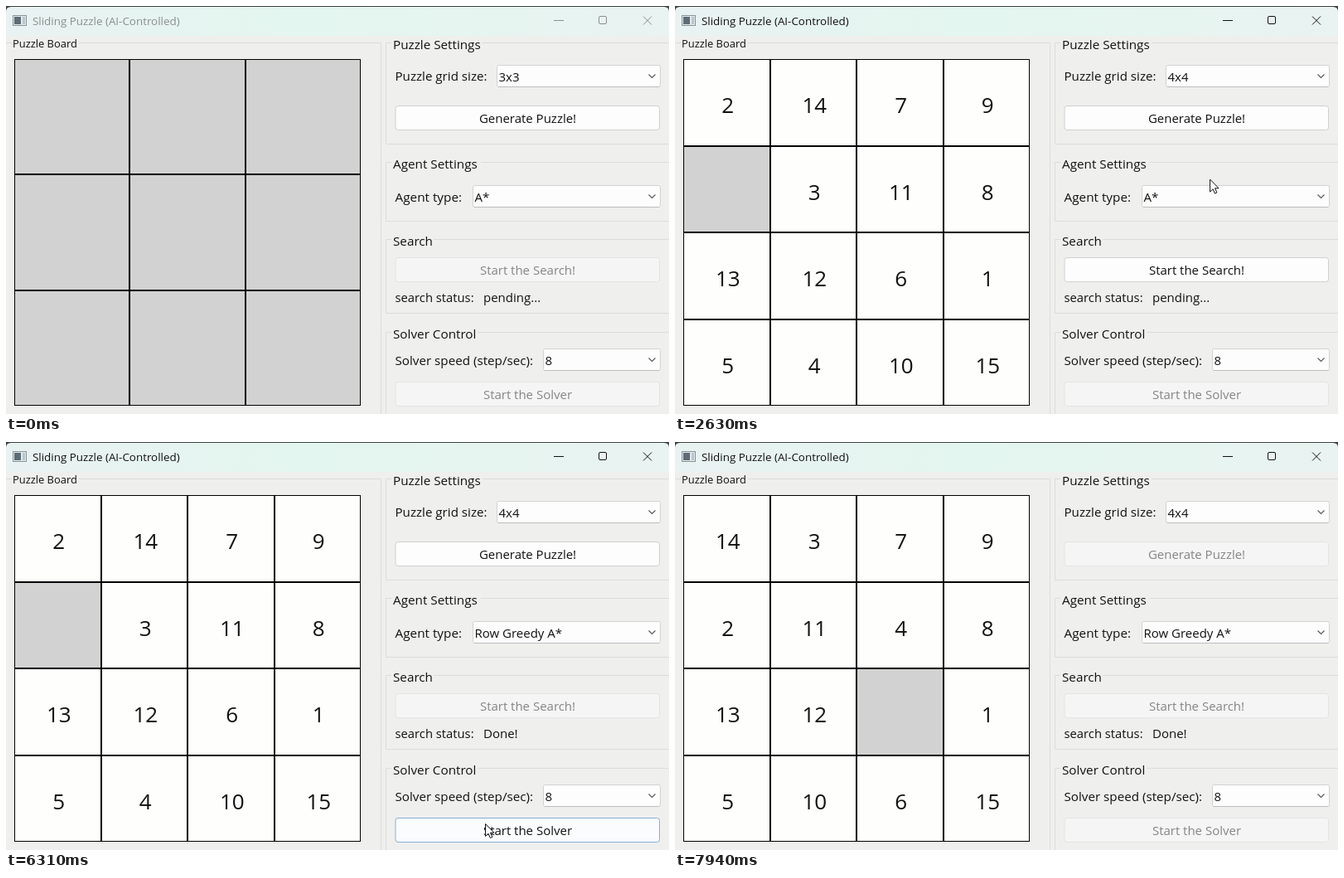
Recreate the animation shown at these times as an HTML page. Size 800 px wide and 492 px high, loop 8 s.

```html
<!DOCTYPE html>
<html lang="en">
<head>
<meta charset="utf-8">
<title>Sliding Puzzle</title>
<style>
html, body { margin: 0; height: 100%; overflow: hidden; background: #efefee; }
svg { display: block; width: 100vw; height: 100vh; font-family: "Open Sans", "Noto Sans", sans-serif; }
text { white-space: pre; }
</style>
</head>
<body>
<svg id="stage" viewBox="0 0 800 492"></svg>
<script>
const LOOP = 8000;
const stage = document.getElementById("stage");

// Moments of the recorded session, in ms
const AT = { sizeOpen: 1000, sizePick: 1560, press: 2090, generated: 2250,
  agentOpen: 2940, agentPick: 3560, search: 4060, done: 5380, solve: 6560 };

// Pointer path: time, x, y
const PATH = [[500, 801, 190], [900, 690, 86], [1050, 690, 86], [1350, 660, 144], [1600, 660, 144],
  [1950, 664, 133], [2350, 664, 133], [2750, 640, 229], [2980, 640, 229], [3250, 624, 285],
  [3600, 624, 285], [3850, 612, 318], [4110, 612, 318], [4350, 590, 402], [5880, 590, 402],
  [6230, 578, 460], [7060, 578, 460], [7400, 574, 494]];

const START = [2, 14, 7, 9, 0, 3, 11, 8, 13, 12, 6, 1, 5, 4, 10, 15];
const MOVES = [2, 14, 3, 12, 4, 10, 6, 4, 12, 11, 4];
const moveTime = i => i < 2 ? 6750 + 130 * i : 7000 + 117 * (i - 2);

const SIZES = ["3x3", "4x4", "5x5", "6x6", "7x7", "8x8"];
const AGENTS = ["A*", "Row Greedy A*", "BFS", "Q-Learning", "DFS", "IDS"];

const between = (t, a, b) => t >= a && t < b;
const rect = (x, y, w, h, fill, stroke = "none", more = "") =>
  `<rect x="${x}" y="${y}" width="${w}" height="${h}" fill="${fill}" stroke="${stroke}" ${more}/>`;
const line = (d, color, width = 1) =>
  `<path d="${d}" fill="none" stroke="${color}" stroke-width="${width}"/>`;
const text = (s, x, y, size = 15.15, color = "#111", more = "") =>
  `<text x="${x}" y="${y}" font-size="${size}" fill="${color}" ${more}>${s}</text>`;
const centred = 'text-anchor="middle"';

function pointer(t) {
  if (t < PATH[0][0]) return { x: 900, y: 190 };
  const i = PATH.findIndex(p => p[0] > t);
  if (i < 0) return { x: 574, y: 520 };
  const [t0, x0, y0] = PATH[i - 1], [t1, x1, y1] = PATH[i];
  const u = (t - t0) / (t1 - t0), e = u * u * (3 - 2 * u);
  return { x: x0 + (x1 - x0) * e, y: y0 + (y1 - y0) * e };
}

function titleBar(active) {
  const ink = active ? "#111" : "#8b8e8d";
  return `<defs><linearGradient id="bar"><stop stop-color="#e9f2f2"/><stop offset=".45" stop-color="#e3f6ef"/>
    <stop offset="1" stop-color="#e9f3f1"/></linearGradient></defs>`
    + rect(0, 0, 800, 20, "#3c4040")
    + `<path d="M0 36V7Q0 1 6 1H794Q800 1 800 7V36Z" fill="url(#bar)"/>`
    + rect(0, 36, 800, 456, "#efefee")
    + rect(8.5, 11.5, 16, 12, "#e4e9ec", "#87939a")
    + rect(10, 13, 8, 9, "#5d6c76") + rect(20, 13, 3, 9, "#b9c5cc")
    + text("Sliding Puzzle (AI-Controlled)", 32, 23, 13.4, ink)
    + line("M661 17.5H673", ink) + rect(715.5, 12.5, 9, 9, "none", ink, 'rx="1.5"')
    + line("M769 12.5L779 22.5M779 12.5L769 22.5", ink);
}

function group(title, y, bottom, lineFrom) {
  return line(`M465 ${y}.5H458.5V${bottom}.5H800M${lineFrom} ${y}.5H800`, "#dcdcdc")
    + text(title, 467, y + 8, 15.25);
}

function button(label, y, enabled, mouse, pressed) {
  const hover = enabled && between(mouse.x, 470, 790) && between(mouse.y, y, y + 30);
  const [fill, edge] = !enabled ? ["#f5f5f5", "#e4e4e4"] : pressed ? ["#cce3f7", "#22629f"]
    : hover ? ["#fafcfd", "#85b0d8"] : ["#fdfdfd", "#d0d0d0"];
  return rect(470, y + .5, 318.5, 29, fill, edge, 'rx="3"')
    + text(label, 629.5, y + 21, 15, enabled ? "#111" : "#858585", centred);
}

function combo(value, x, y, open) {
  return rect(x + .5, y + .5, 789 - x, 26, open ? "#cce3f7" : "#fdfdfd", open ? "#3f88c8" : "#d2d2d2", 'rx="2"')
    + (open ? rect(x + 3.5, y + 3.5, 204, 20, "none", "#333", 'stroke-dasharray="1 1"')
      : line(`M${x + 2} ${y + 26.5}H788`, "#bdbdbd"))
    + text(value, x + 2.5, y + 19.5, 15)
    + line(`M775.5 ${y + 11.5}l4 4 4-4`, "#555", 1.1);
}

function popup(items, x, y, mouse) {
  const row = mouse.y < y ? 0 : Math.floor((mouse.y - y) / 32);
  return rect(x + .5, y + .5, 789 - x, 192, "#f0f0ef", "#a5a5a5")
    + items.map((s, i) => (i === row ? rect(x + 1, y + i * 32, 788 - x, 32, "#0473d0") : "")
      + text(s, x + 7, y + i * 32 + 21, 13.1, i === row ? "#e4eef8" : "#111",
        i ? "" : 'font-weight="600"')).join("");
}

function board(t) {
  const solved = t >= AT.generated, n = solved ? 4 : 3;
  const tiles = solved ? [...START] : Array(9).fill(0);
  MOVES.forEach((tile, i) => {
    if (t < moveTime(i)) return;
    const from = tiles.indexOf(tile), to = tiles.indexOf(0);
    tiles[to] = tile;
    tiles[from] = 0;
  });
  const edge = (o, i) => Math.round(o + 418 * i / n);
  return tiles.map((tile, i) => {
    const c = i % n, r = Math.floor(i / n);
    const x = edge(10, c), y = edge(64, r), w = edge(10, c + 1) - x, h = edge(64, r + 1) - y;
    return rect(x + .5, y + .5, w - 1, h - 1, tile ? "#fefefd" : "#d2d2d2", "#000")
      + (tile ? text(tile, x + w / 2 + 1.3, y + h / 2 + 12.5, 26, "#111", centred) : "");
  }).join("");
}

function status(t) {
  if (!between(t, AT.search, AT.done))
    return text(t < AT.search ? "pending..." : "Done!", 576, 357, 15);
  const swing = 23 * Math.cos((t - 4380) / 1000 * 2 * Math.PI);
  return [-swing, swing].map(d => `<circle cx="${601 + d}" cy="350.5" r="2.5" fill="#1a7fe0"/>`).join("");
}

function scene(t) {
  const mouse = pointer(t);
  const sizeOpen = between(t, AT.sizeOpen, AT.sizePick);
  const agentOpen = between(t, AT.agentOpen, AT.agentPick);
  const busy = between(t, AT.search, AT.done) || t >= AT.solve;
  return titleBar(t >= AT.sizeOpen)
    + line("M0 44.5H7M88 44.5H452.5V492", "#dcdcdc")
    + text("Puzzle Board", 8, 50, 12.9)
    + board(t)
    + group("Puzzle Settings", 44, 166, 575)
    + text("Puzzle grid size:", 469.5, 90)
    + combo(t < AT.sizePick ? "3x3" : "4x4", 592, 71, sizeOpen)
    + button("Generate Puzzle!", 120, !busy, mouse, between(t, AT.press, AT.generated))
    + group("Agent Settings", 188, 259, 573)
    + text("Agent type:", 469.5, 236, 15.3)
    + combo(t < AT.agentPick ? "A*" : "Row Greedy A*", 563, 216, agentOpen)
    + group("Search", 281, 370, 516)
    + button("Start the Search!", 303, between(t, AT.generated, AT.search), mouse, t > AT.search - 90)
    + text("search status:", 469.5, 357, 14.8)
    + status(t)
    + group("Solver Control", 393, 500, 569)
    + text("Solver speed (step/sec):", 469.5, 433, 15.2)
    + combo("8", 648, 413, false)
    + button("Start the Solver", 453, between(t, AT.done, AT.solve), mouse, t > AT.solve - 90)
    + (sizeOpen ? popup(SIZES, 592, 98, mouse) : "")
    + (agentOpen ? popup(AGENTS, 563, 243, mouse) : "")
    + `<path transform="translate(${mouse.x} ${mouse.y})" d="M.5.5V15.5L4 12.2 6.4 17.5 8.8 16.4 6.4 11.2H11Z" fill="#fff" stroke="#111"/>`;
}

function frame(now) {
  stage.innerHTML = scene(now % LOOP);
  requestAnimationFrame(frame);
}
requestAnimationFrame(frame);
</script>
</body>
</html>
```
